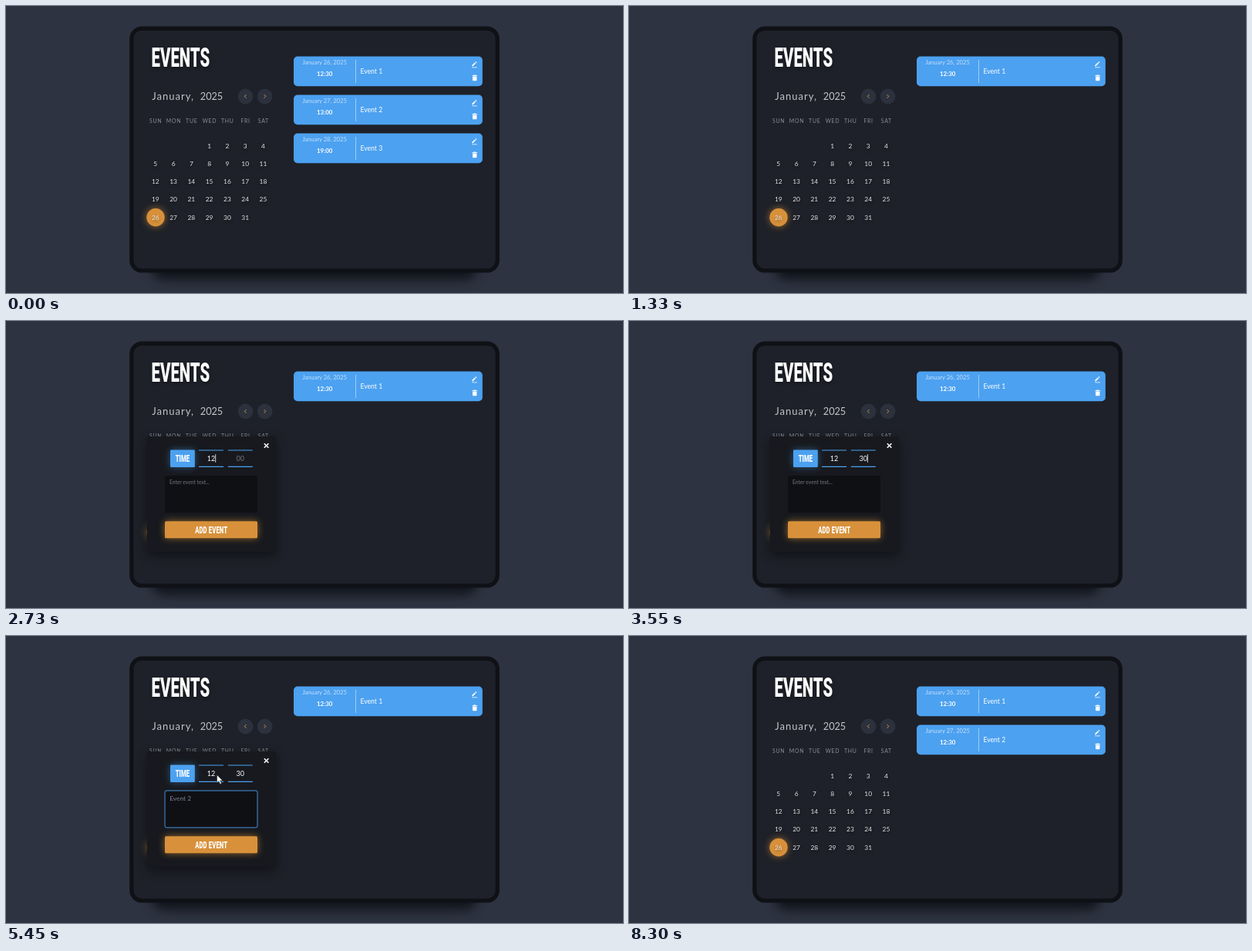
An HTML page that plays this animation: 800 by 373 pixels, repeating every 8330 ms.

```html
<!DOCTYPE html>
<html lang="en">
<head>
<meta charset="utf-8">
<title>Events calendar</title>
<style>
  html, body { margin: 0; width: 100%; height: 100%; overflow: hidden; background: #2d3340; }
  svg { display: block; width: 100%; height: 100%; font-family: Lato, Inter, sans-serif; }
  .mid { text-anchor: middle; }
  .cond { font-family: Roboto, "Liberation Sans", sans-serif; font-weight: 900; fill: #fff; }
  .soft { filter: drop-shadow(0 2px 2px rgba(0,0,0,.4)); }
  .glow-orange { filter: drop-shadow(0 0 5px rgba(220,145,50,.65)); }
  .glow-blue { filter: drop-shadow(0 0 5px rgba(76,161,240,.45)); }
  .lift { filter: drop-shadow(0 5px 7px rgba(0,0,0,.45)); }
  .blur { filter: blur(7px); }
</style>
</head>
<body>
<svg id="stage" viewBox="0 0 800 373"></svg>
<script>
const LOOP = 8330, BLUE = '#4ca1f0', ORANGE = '#d8913a';

const rect = (x, y, w, h, fill, r = 0, extra = '') =>
  `<rect x="${x}" y="${y}" width="${w}" height="${h}" rx="${r}" fill="${fill}" ${extra}/>`;
const text = (x, y, size, fill, str, extra = '') =>
  `<text x="${x}" y="${y}" font-size="${size}" fill="${fill}" ${extra}>${str}</text>`;
const mid = (x, y, size, fill, str, extra = '') =>
  text(x, y, size, fill, str, `class="mid" ${extra}`);
// condensed heading face
const cond = (x, y, size, str, anchor = 'middle', spacing = 0) =>
  `<text class="cond" transform="translate(${x} ${y}) scale(.595 1)" font-size="${size}"
    text-anchor="${anchor}" letter-spacing="${spacing}">${str}</text>`;
const line = (d, stroke, width, extra = '') =>
  `<path d="${d}" fill="none" stroke="${stroke}" stroke-width="${width}" ${extra}/>`;

const PENCIL = 'm16 2 3 3-2.3 2.3-3-3zM4 14v3h3l8.3-8.3-3-3zm0 6h16v2H4z';
const TRASH = 'M5 7v13a2 2 0 0 0 2 2h10a2 2 0 0 0 2-2V7zM16.6 4 15 2H9L7.4 4H3v2h18V4z';

const colX = i => 193.8 + i * 23.28;

function calendar() {
  const week = ['SUN', 'MON', 'TUE', 'WED', 'THU', 'FRI', 'SAT'].map((name, i) =>
    mid(colX(i) + .4, 152.2, 6.9, '#8a8e97', name, 'letter-spacing=".75"')).join('');
  const days = Array.from({ length: 31 }, (_, i) => {
    const cell = i + 3;
    return mid(colX(cell % 7), 184.5 + Math.floor(cell / 7) * 23.3, 8.4, '#e2e3e6', i + 1);
  }).join('');
  const arrow = (x, dir) =>
    `<circle cx="${x}" cy="117.4" r="9.9" fill="#2c313d"/>` +
    line(`M${x - dir} 115.1l${dir * 2.2} 2.3l${-dir * 2.2} 2.3`, '#c99450', 1);
  return `<g class="soft">${cond(188.6, 79.4, 34.2, 'EVENTS', 'start')}</g>` +
    text(189.3, 121.6, 13, '#c3c5ca', 'January,', 'letter-spacing="1"') +
    text(251.8, 121.6, 12.7, '#c3c5ca', '2025') +
    arrow(310.5, -1) + arrow(335.6, 1) + week +
    `<circle class="glow-orange" cx="194" cy="274.7" r="11.7" fill="${ORANGE}"/>` +
    `<g class="soft">${days}</g>`;
}

function card(i) {
  const icon = (d, x, y, s) =>
    `<path d="${d}" fill="#fff" transform="translate(${x} ${y}) scale(${s})"/>`;
  return `<g id="card${i}" transform="translate(0 ${i * 50})">` +
    rect(373, 65.6, 244.8, 38.7, BLUE, 5) +
    mid(413, 76, 7.6, '#c4dffa', `January ${26 + i}, 2025`) +
    mid(413.2, 91.4, 7.9, '#fff', ['12:30', '13:00', '19:00'][i], `id="time${i}" font-weight="700"`) +
    line('M453.5 69.8V100', '#9dcbf7', 1) +
    text(459.5, 88, 8.6, '#fff', `Event ${i + 1}`) +
    icon(PENCIL, 602.5, 71.1, .42) + icon(TRASH, 603, 88.7, .39) + '</g>';
}

function popup() {
  const input = (x, id) =>
    line(`M${x} 168h32M${x} 189.4h32`, BLUE, 1.2) +
    mid(x + 16, 182, 9, '#777', '00', `id="${id}"`);
  return '<g id="popup">' +
    rect(182.5, 150, 167.8, 150, '#17191e', 3, 'class="lift"') +
    line('M334.8 159.2l5.6 5.6m0-5.6l-5.6 5.6', '#fff', 1.6) +
    rect(213, 167.6, 31.8, 22.3, BLUE, 1, 'class="glow-blue"') +
    cond(228.9, 183.3, 13, 'TIME') +
    input(250, 'hours') + input(287.8, 'minutes') +
    rect(206, 201, 120, 48, '#0f1014', 2, 'id="area" stroke-width=".9"') +
    text(212, 212.3, 6.7, '#73767d', 'Enter event text...', 'id="hint"') +
    text(212.2, 213.8, 8.4, '#7d8594', '', 'id="note" xml:space="preserve"') +
    rect(206, 260.2, 120, 22, ORANGE, 1.5, 'class="glow-orange"') +
    cond(266.2, 275.7, 12.8, 'ADD EVENT', 'middle', .3) +
    line('M0 0v10.6', '#fff', .8, 'id="caret"') + '</g>';
}

document.getElementById('stage').innerHTML =
  rect(188, 80, 424, 276, '#11141b', 18, 'class="blur"') +
  rect(160.2, 26.6, 479.6, 320, '#0f1116', 16) +
  rect(165.4, 31.9, 469.2, 309.3, '#1e2129', 11) +
  calendar() + [0, 1, 2].map(card).join('') + popup() +
  `<path id="mouse" d="M0 0v10.4l2.4-2.2 1.7 3.9 1.8-.8-1.7-3.8h3.3z"
    fill="#fff" stroke="#22252c" stroke-width=".6"/>`;

const $ = id => document.getElementById(id);
const show = (id, on) => $(id).setAttribute('display', on ? 'inline' : 'none');
const typed = (str, t, start, step) =>
  str.slice(0, Math.max(0, Math.floor((t - start) / step) + 1));

function field(id, str) {
  $(id).textContent = str || '00';
  $(id).setAttribute('fill', str ? '#fff' : '#777');
}

function draw(t) {
  const added = t >= 6250;
  show('card1', t < 1060 || added);
  show('card2', t < 400);
  $('time1').textContent = added ? '12:30' : '13:00';
  show('popup', t >= 1580 && !added);

  field('hours', typed('12', t, 2350, 200));
  field('minutes', typed('30', t, 3150, 200));

  const note = typed('Event 2', t, 4300, 120);
  const focused = t >= 3950;
  $('note').textContent = note;
  show('hint', !note);
  $('area').setAttribute('stroke', focused ? BLUE : 'none');

  // caret sits behind whatever was typed last in the focused field
  const inHours = t < 2850;
  const source = $(focused ? 'note' : inHours ? 'hours' : 'minutes');
  const end = focused ? 212.6 + (note ? source.getComputedTextLength() : 0)
                      : inHours ? 271.7 : 309.4;
  $('caret').setAttribute('transform', `translate(${end} ${focused ? 205.6 : 173.2})`);
  $('caret').setAttribute('stroke', focused ? '#7d8594' : '#fff');
  show('caret', t >= 2150 && t < 5200);

  const p = Math.min(1, Math.max(0, (t - 5480) / 520));
  const ease = p * p * (3 - 2 * p);
  $('mouse').setAttribute('transform', `translate(${273.5 - 3 * ease} ${180.4 + 82 * ease})`);
  show('mouse', t >= 5380 && !added);
}

const began = performance.now();
function tick() {
  draw((performance.now() - began) % LOOP);
  requestAnimationFrame(tick);
}
tick();
</script>
</body>
</html>
```
